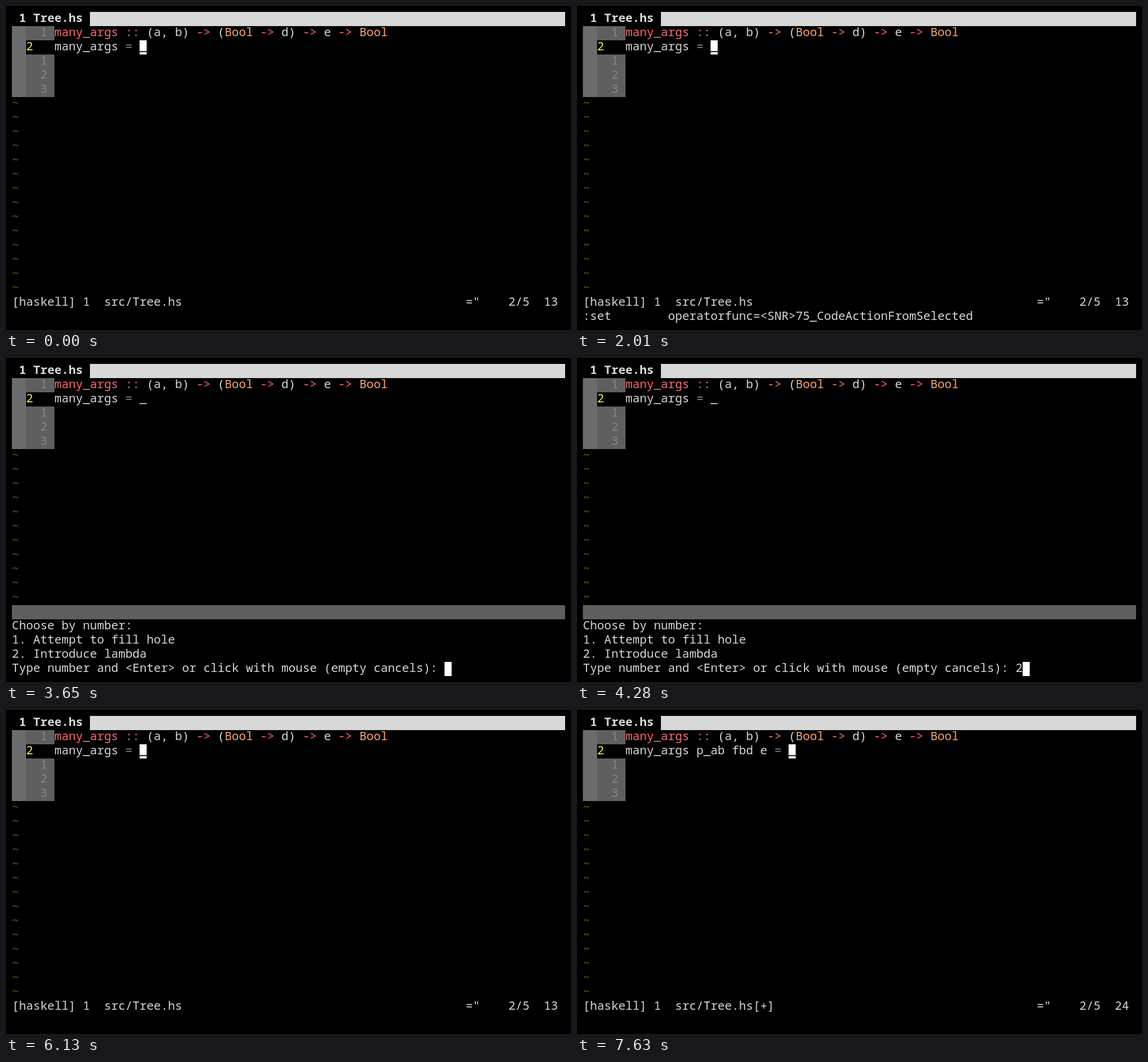
An HTML page that plays this animation: 956 px wide and 548 px high, repeating every 8000 ms.

```html
<!DOCTYPE html>
<html lang="en">
<head>
<meta charset="utf-8">
<title>Editor session</title>
<style>
  html, body { margin: 0; width: 100%; height: 100%; overflow: hidden; background: #000; }
  svg { display: block; width: 956px; height: 548px; }
  text { font: 20px "Noto Sans Mono", monospace; white-space: pre; fill: #d8d8d8; }
  .tab { font-weight: 600; }
  .red { fill: #fb6b6f; }
  .type { fill: #ffa66d; }
  .op, .num { fill: #878787; }
  .cur { fill: #f5e250; }
  .tilde { fill: #4e6a10; }
  .ink { fill: #000; }
  .sign { fill: #6c6c6c; }
  .gutter { fill: #5f5f5f; }
  .bar { fill: #d8d8d8; }
  .block { fill: #fff; }

  /* Each scene is a hard cut on the shared 8 s clock. */
  .scene { visibility: hidden; animation: 8s step-end infinite; }
  .edit { animation-name: edit; }
  .command { animation-name: command; }
  .prompt { animation-name: prompt; }
  .ask { animation-name: ask; }
  .answer { animation-name: answer; }
  .hole { animation-name: hole; }
  .before { animation-name: before; }
  .after { animation-name: after; }
  .landed { animation-name: landed; }
  .jumped { animation-name: jumped; }
  .col13 { animation-name: col13; }
  @keyframes edit { 0%, 76.625% { visibility: visible } 33.875% { visibility: hidden } }
  @keyframes command { 0%, 33.875% { visibility: hidden } 12.125% { visibility: visible } }
  @keyframes prompt { 0%, 76.625% { visibility: hidden } 33.875% { visibility: visible } }
  @keyframes ask { 0%, 53.5% { visibility: hidden } 33.875% { visibility: visible } }
  @keyframes answer { 0%, 76.625% { visibility: hidden } 53.5% { visibility: visible } }
  @keyframes hole { 0%, 76.625% { visibility: visible } 33.875%, 77% { visibility: hidden } }
  @keyframes before { 0% { visibility: visible } 77% { visibility: hidden } }
  @keyframes after { 0% { visibility: hidden } 77%, 100% { visibility: visible } }
  @keyframes landed { 0%, 95.375% { visibility: hidden } 77% { visibility: visible } }
  @keyframes jumped { 0% { visibility: hidden } 95.375%, 100% { visibility: visible } }
  @keyframes col13 { 0%, 76.625% { visibility: visible } 33.875%, 95.375% { visibility: hidden } }
</style>
</head>
<body>
<svg id="screen" viewBox="0 0 956 548"></svg>
<script>
  const CELL = 12, LINE = 24, PAD = 10, BASE = 17;
  const esc = s => s.replace(/&/g, '&amp;').replace(/</g, '&lt;');
  const x = col => PAD + col * CELL;
  const y = row => PAD + row * LINE;

  const box = (row, col, cols, cls, rows = 1) =>
    `<rect class="${cls}" x="${x(col)}" y="${y(row)}" width="${cols * CELL}" height="${rows * LINE}"/>`;
  const put = (row, col, str, cls = '') =>
    `<text class="${cls}" x="${x(col)}" y="${y(row) + BASE}">${esc(str)}</text>`;
  const cursor = (row, col, ch = '') => box(row, col, 1, 'block') + put(row, col, ch, 'ink');
  const scene = (name, ...parts) => `<g class="scene ${name}">${parts.join('')}</g>`;
  const tildes = (from, to) => {
    let out = '';
    for (let row = from; row <= to; row++) out += put(row, 0, '~', 'tilde');
    return out;
  };

  const signature = [
    [6, 'many_args ::', 'red'], [19, '(a, b)'], [26, '->', 'red'], [29, '('],
    [30, 'Bool', 'type'], [35, '->', 'red'], [38, 'd)'], [41, '->', 'red'],
    [44, 'e'], [46, '->', 'red'], [49, 'Bool', 'type']
  ].map(([col, str, cls]) => put(1, col, str, cls));

  const gutter = [
    box(1, 0, 2, 'sign', 5), box(1, 2, 4, 'gutter'), box(3, 2, 4, 'gutter', 3),
    put(1, 4, '1', 'num'), put(2, 2, '2', 'cur'),
    ...[1, 2, 3].map(n => put(n + 2, 4, String(n), 'num'))
  ];

  document.getElementById('screen').innerHTML = [
    put(0, 1, '1 Tree.hs', 'tab'), box(0, 11, 67, 'bar'),
    ...gutter, ...signature, put(2, 6, 'many_args'), tildes(6, 16),

    scene('before', put(2, 16, '=', 'op'), put(2, 18, '_')),
    scene('hole', cursor(2, 18, '_')),
    scene('after', put(2, 16, 'p_ab fbd e'), put(2, 27, '=', 'op'), put(2, 29, '_'), put(20, 24, '[+]')),
    scene('landed', cursor(2, 18, 'a')),
    scene('jumped', cursor(2, 29, '_'), put(20, 75, '24')),

    scene('edit', tildes(17, 19), put(20, 0, '[haskell] 1  src/Tree.hs'),
      put(20, 64, '="'), put(20, 70, '2/5')),
    scene('col13', put(20, 75, '13')),
    scene('command', put(21, 0, ':set        operatorfunc=<SNR>75_CodeActionFromSelected')),

    scene('prompt', box(17, 0, 78, 'gutter'),
      put(18, 0, 'Choose by number:'),
      put(19, 0, '1. Attempt to fill hole'),
      put(20, 0, '2. Introduce lambda'),
      put(21, 0, 'Type number and <Enter> or click with mouse (empty cancels): ')),
    scene('ask', cursor(21, 61)),
    scene('answer', put(21, 61, '2'), cursor(21, 62))
  ].join('');
</script>
</body>
</html>
```
